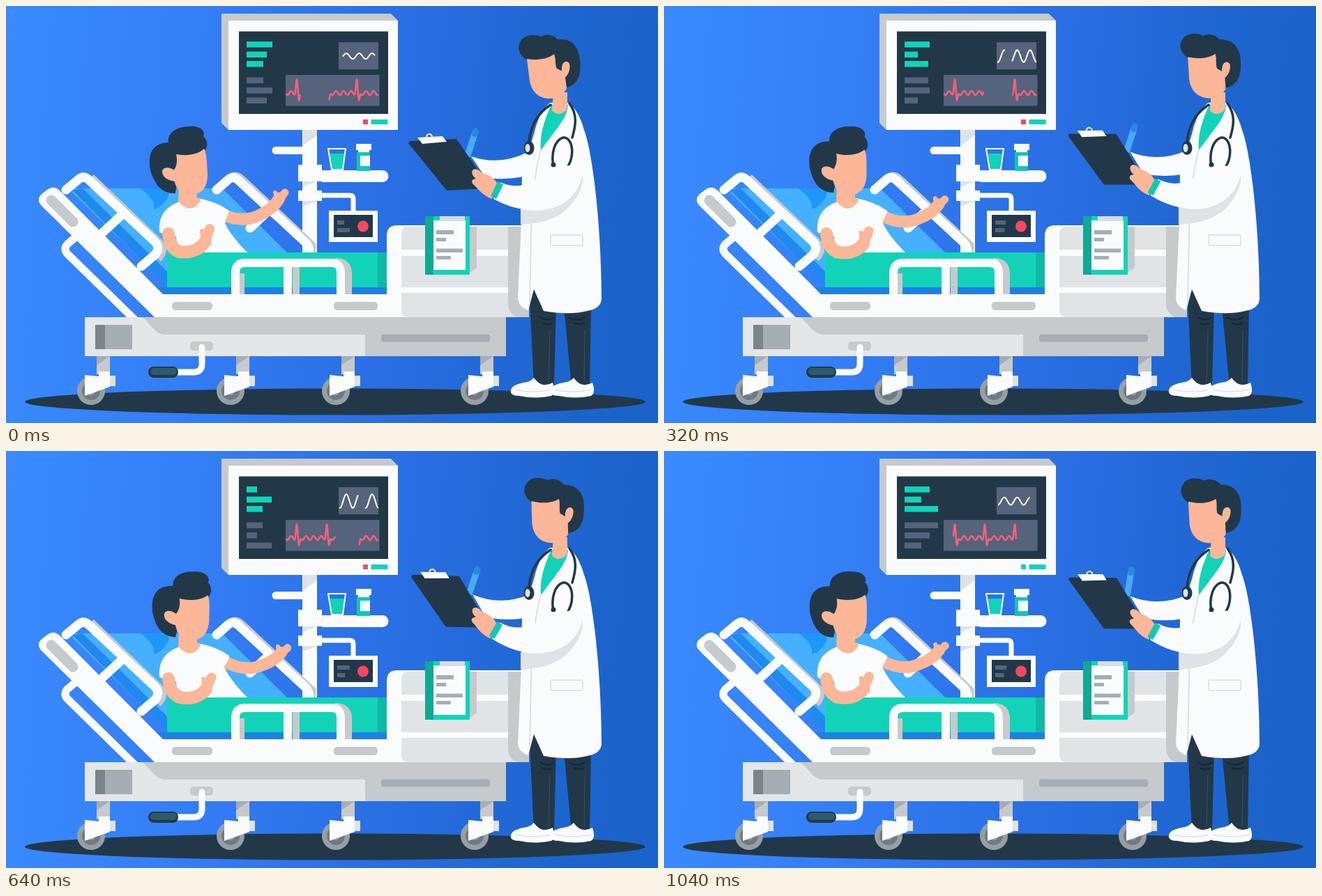
These frames come from a looping animation (935 by 599 pixels, 1120 ms). An HTML page:

```html
<!DOCTYPE html>
<html lang="en">
<head>
<meta charset="utf-8">
<title>Hospital visit</title>
<style>
html, body { margin: 0; height: 100%; overflow: hidden; background: #2c74e8; }
svg { display: block; width: 100vw; height: 100vh; }
.w { fill: #fafbfc; } .d { fill: #223849; } .t { fill: #12d3b8; } .s { fill: #fbb797; }
.g { fill: #c6cacd; } .m { fill: #a6adb4; } .p { fill: #55637c; }
.line { fill: none; stroke: #fafbfc; stroke-linecap: round; stroke-linejoin: round; }
.limb { fill: none; stroke: #fbb797; stroke-linecap: round; stroke-linejoin: round; }
.tube { fill: none; stroke: #223849; stroke-width: 3.5; stroke-linecap: round; }
.shade { fill: none; stroke: #c6cacd; }
</style>
</head>
<body>
<svg viewBox="0 0 935 599" preserveAspectRatio="none">
<defs>
  <linearGradient id="sky" x2="1" y2=".05">
    <stop stop-color="#3a8bff"/><stop offset=".3" stop-color="#347ef6"/>
    <stop offset=".6" stop-color="#2a6fe4"/><stop offset=".92" stop-color="#1c64cc"/>
    <stop offset="1" stop-color="#1b63cb"/>
  </linearGradient>
  <g id="wheel">
    <path class="g" d="M130 503h19v26h-19z"/><path class="m" d="M130 503h19l-19 13z"/>
    <circle cx="122" cy="553" r="20" fill="#979fa6"/>
    <circle cx="122" cy="553" r="13" fill="#717a83"/><circle cx="122" cy="553" r="6" fill="#979fa6"/>
    <path d="M146 531h11v15h-11z" fill="#dfe2e5"/>
    <path class="w" d="M113 530l20 2V525h16v22l-36 13z"/>
  </g>
  <g id="shoe">
    <path class="w" d="M724 555Q722 545 742 541Q752 540 757 534Q768 550 784 541Q789 556 782 560Q760 565 736 560Q725 560 724 555z"/>
    <path d="M731 551Q752 557 784 551" fill="none" stroke="#dfe3e6" stroke-width="1.5"/>
  </g>
</defs>

<rect width="935" height="599" fill="url(#sky)"/>
<ellipse cx="472" cy="568.5" rx="445" ry="19" class="d"/>

<!-- stand and shelf -->
<path class="w" d="M425 176h21v180h-21z"/>
<path d="M426 178h20v8l-20 14z" fill="#dfe2e5"/>
<path class="line" stroke-width="11" d="M387 207.500H428"/>
<path class="w" d="M419 228h34v8h87a8.500 8.500 0 0 1 0 17h-87v-1h-34zM419 265h34v15h-34z"/>
<path d="M425 252h21l-21 8zM425 280h21l-21 8z" fill="#dfe2e5"/>
<path class="line" stroke-width="7" d="M450 272H493Q498 272 498 277V296"/>
<path d="M464 212h22l-3 22h-15z" class="t"/>
<path class="line" stroke-width="2" d="M462 205H487L483 235H467z"/>
<path d="M503 210h19v27h-19z" fill="#12c7b0"/>
<path class="w" d="M502 198h22v9h-3v3h-16v-3h-3zM508 215h14v15h-14z"/>
<path class="w" d="M463 294h70v45h-70z"/><path class="d" d="M470 300h56v32h-56z"/>
<circle cx="512" cy="316.500" r="8" fill="#f4495f"/>
<rect id="mini0" class="p" x="475" y="308" height="6"/>
<rect id="mini1" class="p" x="475" y="319" height="6"/>

<!-- monitor -->
<path class="g" d="M309 11H552L562 21V30H330V178H319L309 168z"/>
<path class="w" d="M319 21H562V178H319z"/>
<path class="d" d="M334 36.500H548V155H334z"/>
<path class="p" d="M477 52h57v39h-57zM401 99h134.500v44.500H401z"/>
<g id="bars"></g>
<path id="wave" fill="none" stroke="#fff" stroke-width="2"/>
<path id="pulse" fill="none" stroke="#f4607a" stroke-width="2.600" stroke-linejoin="round"/>
<rect id="lamp" x="512" y="163" width="7" height="7"/>
<path class="t" d="M523.500 163h24v7h-24z"/>

<!-- backrest and far rail -->
<path fill="#45b0ff" d="M98 262H310L405 356L240 410L95 268z"/>
<path fill="#1e97fa" d="M192 262H222Q240 264 230 278Q222 290 212 292Q214 276 192 262z"/>
<path fill="#2089f0" d="M95 264L110 262L250 400L236 408z"/>
<path class="shade" stroke-width="13" d="M324 246Q331 243 338 250L438 344V354"/>
<path class="line" stroke-width="13" stroke-linecap="butt" d="M302 264L318 250Q325 243 333 250L430 340Q435 346 435 354M350 319L372 298"/>

<!-- patient -->
<path class="w" d="M220 325Q217 292 249 281L251 276H275Q302 281 320 294L314 312Q322 330 347 355H246L244 331Q232 330 220 325z"/>
<g id="reach">
  <path class="limb" stroke-width="17" d="M316 302Q346 312 368 298Q384 290 392 276"/>
  <path class="limb" stroke-width="11" d="M392 278L400 268"/><path class="limb" stroke-width="6" d="M389 277L386 268"/>
  <path class="w" d="M300 286L320 294L313 313L296 306z"/>
</g>
<path class="s" d="M248 258H274V276L280 278Q266 302 247 281z"/>
<g id="head1">
  <path class="d" d="M243 269C222 270 213 255 207 236C203 215 208 197 233 196C231 182 245 173 262 173C280 171 286 181 283 187C291 194 289 205 284 208L246 245z"/>
  <path class="s" d="M240 237C247 228 245 218 244 213C260 216 276 213 284 205C288 212 288 224 289 242C289 262 280 270 266 271C250 272 244 262 241 250z"/>
  <path class="s" d="M243 237C235 230 224 231 224 238C224 246 233 251 243 252z"/>
</g>

<!-- bed -->
<path class="t" d="M231 354H546V405H231z"/>
<path fill="#10b9a5" d="M533 354h13v51h-13z"/>
<path fill="#1e80e6" d="M215 404H546V416H215z"/>
<path class="limb" stroke-width="18" d="M233 327Q236 350 249 353"/>
<g id="fold">
  <path class="limb" stroke-width="18" d="M248 353Q274 356 286 338"/>
  <path class="limb" stroke-width="14" d="M286 338L292 320"/><path class="limb" stroke-width="6" d="M283 336L281 323"/>
</g>
<path class="shade" stroke-width="8" d="M123 245L220 338Q232 350 219 364"/>
<path class="line" stroke-width="13" stroke-linecap="butt" d="M86 264L104 249Q111 243 118 249L213 338Q222 347 214 357L194 374M139 325L166 300"/>
<path class="line" stroke-width="11" d="M100 332L88 342Q82 349 88 356L184 450"/>
<path fill="#e4e6e8" d="M113 447H717V503H113z"/>
<path class="g" d="M196 447H717V503H515V472H228Q220 472 212 464z"/>
<path class="w" d="M52 288Q43 279 50 271L59 264Q68 257 77 265L225 414H568V447H213z"/>
<path class="shade" stroke-width="15" d="M65 279L96 310" stroke-linecap="round"/>
<rect class="g" x="238" y="425" width="58" height="12" rx="5"/>
<rect class="g" x="470" y="425" width="63" height="12" rx="5"/>
<rect class="m" x="538" y="471.500" width="156" height="11" rx="4"/>
<path class="m" d="M128 458h53v35h-53z"/><path fill="#7c848b" d="M128 458h14v35h-14z"/>
<rect class="g" x="264" y="482" width="33" height="13" rx="5"/>
<path class="line" stroke-width="9" d="M281 490V514Q281 526 269 526H246"/>
<rect x="204" y="518" width="43" height="16" rx="8" class="d"/>
<rect x="207" y="520" width="38" height="10" rx="5" fill="#2f5b69"/>
<use href="#wheel"/><use href="#wheel" x="200"/><use href="#wheel" x="351"/><use href="#wheel" x="550"/>
<path class="shade" stroke-width="10" d="M337 414V384M416 372V414M472 367Q491 367 491 384V414"/>
<path class="line" stroke-width="12" stroke-linecap="butt" d="M329 414V383Q329 369 343 369H467Q480 369 480 383V414M404 369V414"/>

<!-- footboard -->
<path class="w" d="M546 447V330Q546 315 561 315H750V447z"/>
<path fill="#e1e4e6" d="M567 350V328Q567 317 578 317H750V350zM567 359H750V404H567zM567 412H750V447H577Q567 447 567 436z"/>
<path class="g" d="M720 317h30v130h-17q-13-6-13-20z"/>
<path class="g" d="M664 317h11v59l-11 8z"/>
<path class="t" d="M601 302h64v84h-64z"/><path fill="#0fa994" d="M601 302h12v84h-12z"/>
<path class="w" d="M613 308h46v71h-46z"/><path fill="#d9dde0" d="M622 302h36v7h-36z"/>
<path class="m" d="M617 322h25v6h-25zM617 333h14v5h-14zM617 348.500h38v5.500h-38zM617 359h21v5h-21z"/>

<!-- doctor -->
<g class="arm">
  <g id="pen"><path d="M663 216V178" stroke="#4aa9fd" stroke-width="9"/><path d="M663 182V178" stroke="#2a86e6" stroke-width="9" stroke-linecap="round"/></g>
  <path class="w" d="M667 216Q708 230 748 210L768 236Q735 252 688 247z"/>
</g>
<path class="d" d="M750 400L757 546Q772 553 786 544L789 430zM800 432L811 546Q825 552 837 544L839 430z"/>
<path d="M766 447q10 7 20 0M768 455q8 5 16 0M806 447q12 7 25 0M814 455q8 4 16 0" fill="none" stroke="#122636" stroke-width="2"/>
<path d="M780 465L778 540M830 465L829 540" stroke="#3b4f60"/>
<use href="#shoe"/><use href="#shoe" x="57"/>
<path class="w" d="M780 139Q764 152 757 184L740 240L739 310L734 420Q735 432 749 437L757 407L771 438Q810 445 838 437Q853 433 854 421C854 330 843 215 829 178Q820 146 804 138z"/>
<path class="t" d="M782 142L806 142Q806 154 793 172L767 207Q764 180 782 142z"/>
<path class="s" d="M785 124H805V141Q806 150 799 153Q789 158 783 150z"/>
<path d="M767 206Q753 260 753 330L751 425" fill="none" stroke="#dde1e5" stroke-width="2"/>
<path fill="#dfe2e6" d="M738 289Q800 300 826 238Q832 262 806 290Q785 312 738 314z"/>
<rect x="781" y="329" width="46" height="15" rx="2" fill="none" stroke="#e2e5e8" stroke-width="2"/>
<path class="tube" d="M781 142C762 154 752 172 750 196M808 140C820 156 817 172 812 189M785 229C781 210 788 192 799 189C813 188 817 216 803 235"/>
<ellipse cx="750" cy="204" rx="7.500" ry="10" class="d"/><ellipse cx="748" cy="204" rx="3.500" ry="6" fill="#dfe3e6"/>
<circle cx="785" cy="228" r="3.500" class="d"/><circle cx="802" cy="235" r="3.500" class="d"/>
<g id="head2">
  <path class="d" d="M748 78C734 70 733 58 738 51C744 38 765 42 767 44C775 39 786 42 791 48C812 46 822 60 823 78C826 102 818 114 803 117L760 100z"/>
  <path class="s" d="M747 76C760 78 776 77 786 69C789 76 787 84 790 90L801 95L804 118C800 128 790 134 778 133C762 132 754 122 751 108z"/>
  <path class="s" d="M797 92C796 79 805 77 808 83C810 91 806 100 800 104z"/>
</g>
<g class="arm">
  <path class="d" d="M577 197L579 194L646 191L692 258L688 262L632 265z"/>
  <path class="w" d="M590 189L626 187L632 195L597 198z"/>
  <circle cx="607" cy="188" r="4" fill="none" stroke="#fafbfc" stroke-width="2"/>
  <path class="s" d="M669 236Q673 231 683 240Q699 244 705 256L697 277Q685 273 676 262L669 255Q666 249 674 248Q666 242 669 236z"/>
  <path class="w" d="M709 253Q745 270 780 233L829 226Q826 283 772 293Q735 297 699 277z"/>
  <path d="M709 254L699 275" stroke="#10c9b0" stroke-width="9"/>
</g>
</svg>
<script>
const STEP = 80, COUNT = 14, KEYS = [0, 2, 4, 6, 8, 10, 13];
const el = id => document.getElementById(id);
const set = (node, attrs) => { for (const a in attrs) node.setAttribute(a, attrs[a]); };
const turn = (node, deg, x, y) => set(node, { transform: `rotate(${deg} ${x} ${y})` });
const clamp = v => Math.max(0, Math.min(1, v));

function tween(values, k) {
  const i = Math.max(1, KEYS.findIndex(key => key >= k)), a = KEYS[i - 1];
  return values[i - 1] + (values[i] - values[i - 1]) * (k - a) / (KEYS[i] - a);
}

// Traces y(x), leaving out a gap that wraps round after `span`.
function trace(from, to, gapStart, gapEnd, span, y) {
  let d = "", down = false;
  for (let x = from; x <= to; x += 0.5) {
    const hidden = [0, span, -span].some(o => x > gapStart + o && x < gapEnd + o);
    if (!hidden) d += (down ? "L" : "M") + x + " " + y(x).toFixed(1);
    down = !hidden;
  }
  return d;
}

function beat(x) {
  const u = (x - 395.5 + 43) % 43 - 21.5;
  const bump = (at, width) => Math.exp(-(((u - at) / width) ** 2));
  return 125 - 3 * Math.sin(u * 2 * Math.PI / 10.75) - 20 * bump(0, 1.7) + 14 * bump(3, 1.6);
}

const widths = [
  [37, 41, 36, 20, 15, 27, 36],
  [29, 15, 19, 32, 36, 29, 24],
  [24, 36, 34, 25, 23, 37, 48]
];
const gap = [[422, 440, 458, 463, 472, 491, 505], [463, 479, 499, 503, 506, 526, 549]];
const order = [0, 1, 2, 2, 0, 1];
const bars = [51, 65.5, 79, 102.5, 117, 131.5].map((y, i) => {
  const bar = document.createElementNS("http://www.w3.org/2000/svg", "rect");
  set(bar, { x: 345, y, height: 8.5, class: i < 3 ? "t" : "p" });
  return el("bars").appendChild(bar);
});
const arms = document.querySelectorAll(".arm");
const red = [244, 73, 95], teal = [18, 211, 184];

function draw(now) {
  const k = Math.floor(now / STEP) % COUNT;
  const sway = Math.sin(Math.PI * k / 18);
  turn(el("head1"), 4.8 * sway, 262, 270);
  turn(el("head2"), 5.5 * sway, 792, 142);
  turn(el("reach"), 9 * sway, 306, 300);
  turn(el("fold"), 6 * sway, 242, 347);
  arms.forEach(arm => turn(arm, 4.3 * sway, 800, 240));
  turn(el("pen"), 9 + 9 * Math.cos(Math.PI * k / 2) - 4 * sway, 663, 212);

  bars.forEach((bar, i) => set(bar, { width: tween(widths[order[i]], k) }));
  set(el("mini0"), { width: 10 + 8 * sway });
  set(el("mini1"), { width: 18 - 7 * sway });

  const amp = 4 + 6 * Math.sin(Math.PI * k / COUNT), start = 473 + 4 * k;
  set(el("wave"), { d: trace(478, 534, start, start + 10, 56,
    x => 72 - amp * Math.cos((x - 488) * 2 * Math.PI / 18.5)) });
  set(el("pulse"), { d: trace(401.5, 534, tween(gap[0], k), tween(gap[1], k), 134, beat) });

  const mix = clamp((k - 7) / 5);
  set(el("lamp"), { fill: `rgb(${red.map((c, i) => c + (teal[i] - c) * mix)})` });
  requestAnimationFrame(() => draw(performance.now()));
}
draw(0);
</script>
</body>
</html>
```
